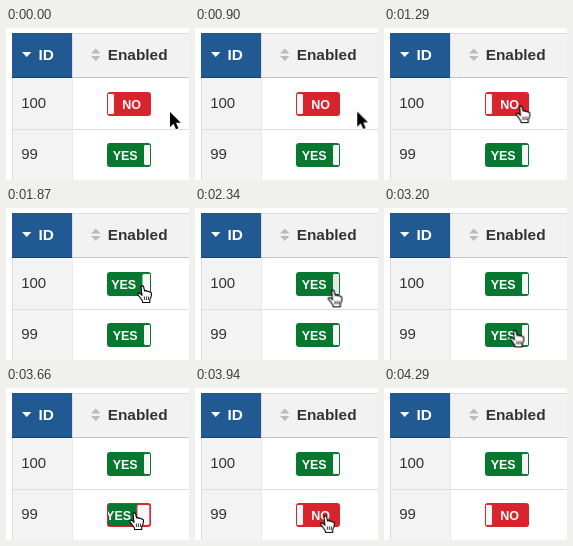
These frames come from a looping animation (183x152 px, 5.05 s). An HTML page:

```html
<!DOCTYPE html>
<html lang="en">
<head>
<meta charset="utf-8">
<title>Enabled column toggles</title>
<style>
  html, body { margin: 0; width: 100%; height: 100%; overflow: hidden; background: #fff; }
  svg.stage { display: block; width: 183px; height: 152px; }
  text { font: 15px "Liberation Sans", Arial, sans-serif; fill: #333; }
  .head { font-size: 15.4px; font-weight: bold; }
  .label { font-size: 12.5px; font-weight: bold; fill: #fff; text-anchor: middle; }
</style>
</head>
<body>
<svg class="stage" viewBox="0 0 183 152">
  <rect x="6" y="5" width="60" height="45" fill="#215a92"/>
  <rect x="66" y="5" width="117" height="45" fill="#f2f2f2"/>
  <rect x="6" y="50" width="60" height="102" fill="#f3f3f3"/>
  <path d="M6.5 50V152M6 101.5H183M66 5.5H183M66.5 5V49" stroke="#ddd"/>
  <path d="M66.5 50V152" stroke="#eaeaea"/>
  <path d="M6 49.5H66" stroke="#163f69"/>
  <path d="M66 49.5H183" stroke="#c4c4c4"/>
  <path d="M16 24h9.4l-4.7 5z" fill="#fff"/>
  <path d="M85 25.5h9.6l-4.8-5zM85 28h9.6l-4.8 5z" fill="#bbb"/>
  <text class="head" x="32.6" y="32">
    <tspan fill="#fff">ID</tspan>
  </text>
  <text class="head" x="101.7" y="32">Enabled</text>
  <text x="15.2" y="80">100</text>
  <text x="15.2" y="131">99</text>
  <g id="toggles"></g>
  <g id="cursor">
    <path id="arrow" d="M0 0V15L3.5 11.7L6 17.3L8.4 16.3L6 10.8H10.8Z"
      fill="#000" stroke="#fff" stroke-width="1.2" paint-order="stroke"/>
    <g id="hand" transform="translate(-5 -1)" stroke="#000" stroke-width="1.1" stroke-linejoin="round">
      <path fill="#fff" d="M4 1.8C4.4.5 6.2.5 6.6 1.8L7.6 6C8.5 5.3 9.8 5.6 10.2 6.5
        C11 5.9 12.1 6.2 12.5 7.1C13.5 6.8 14.3 7.4 14.4 8.5C14.6 10.5 14.2 12.4 12.8 14.5
        V17.5H5.6L5.4 16C4.2 14 2.6 11.8.8 9.7C.5 8.3 2 7.6 3.2 8.6L5 10.3Z"/>
      <path fill="none" stroke-width=".8" d="M7.4 11.5V15M9.4 11.5V15M11.4 11.5V15"/>
    </g>
  </g>
</svg>
<script>
const LOOP = 5050, TICK = 57.5, MOVE_START = 830;
const RED = "#d8242c", GREEN = "#07782f";
const SLIDE = 42, SLIDE_MS = 350;
const animations = [];

// Keyframe rows are [ms, properties, easing to the next row].
function animate(el, rows) {
  const frames = rows.map(([ms, props, easing = "linear"]) =>
    ({ offset: ms / LOOP, easing, ...props }));
  const anim = el.animate(frames, { duration: LOOP, fill: "both" });
  anim.pause();
  animations.push(anim);
}

// Holds each value until the next time in the table.
function hold(el, name, rows) {
  const steps = rows.map(([ms, value]) => [ms, { [name]: value }, "step-end"]);
  animate(el, [...steps, [LOOP, { [name]: rows.at(-1)[1] }]]);
}

const shift = (x, y = 0) => ({ transform: `translate(${x}px, ${y}px)` });

function addToggle(y, startsOn, clickAt) {
  const group = document.createElementNS("http://www.w3.org/2000/svg", "g");
  group.setAttribute("transform", `translate(101 ${y})`);
  group.innerHTML = `
    <rect class="frame" width="44" height="24" rx="3"/>
    <svg x="1" y="1" width="42" height="22" overflow="hidden">
      <g class="track">
        <rect width="42" height="22" fill="${GREEN}"/>
        <rect x="42" width="42" height="22" fill="${RED}"/>
        <rect class="knob" x="35.5" y=".5" width="13" height="21" rx="2"/>
        <text class="label" x="17.2" y="15.6">YES</text>
        <text class="label" x="65.5" y="15.6">NO</text>
      </g>
    </svg>`;
  document.getElementById("toggles").append(group);
  const [track, frame, knob] = ["track", "frame", "knob"].map(name => group.querySelector("." + name));
  const from = shift(startsOn ? 0 : -SLIDE), to = shift(startsOn ? -SLIDE : 0);
  const [before, after] = startsOn ? [GREEN, RED] : [RED, GREEN];
  animate(track, [
    [0, from], [clickAt, from, "ease"], [clickAt + SLIDE_MS, to], [LOOP, to]
  ]);
  hold(frame, "fill", [[0, before], [clickAt, after]]);
  hold(knob, "stroke", [[0, before], [clickAt, after]]);
  return knob;
}

const upperKnob = addToggle(64, false, 1610);
const lowerKnob = addToggle(115, true, 3610);
hold(upperKnob, "fill", [[0, "#f7f7f7"], [2270, "#e6e6e6"], [2490, "#f7f7f7"]]);
hold(lowerKnob, "fill", [[0, "#f7f7f7"]]);

const [cursor, arrow, hand] = ["cursor", "arrow", "hand"].map(id => document.getElementById(id));
animate(cursor, [
  [0, shift(164, 84)], [800, shift(164, 84), "ease-in-out"],
  [1350, shift(136, 78)], [2165, shift(136, 78), "ease-in-out"],
  [2730, shift(144, 101)], [2735, shift(144, 101), "ease-in-out"],
  [3260, shift(130, 123)], [3420, shift(128, 125)],
  [3835, shift(128, 125), "ease-in"], [4280, shift(148, 156)], [LOOP, shift(148, 156)]
]);
const handTimes = [[0, false], [1050, true], [2490, false], [2960, true], [4050, false]];
const visibility = on => on ? "visible" : "hidden";
hold(hand, "visibility", handTimes.map(([ms, on]) => [ms, visibility(on)]));
hold(arrow, "visibility", handTimes.map(([ms, on]) => [ms, visibility(!on)]));

function render() {
  const time = performance.now() % LOOP;
  const tick = Math.floor((time - MOVE_START) / TICK);
  const shown = tick < 0 ? 0 : Math.min(840 + tick * TICK, LOOP);
  for (const anim of animations) anim.currentTime = shown;
  requestAnimationFrame(render);
}
render();
</script>
</body>
</html>
```
